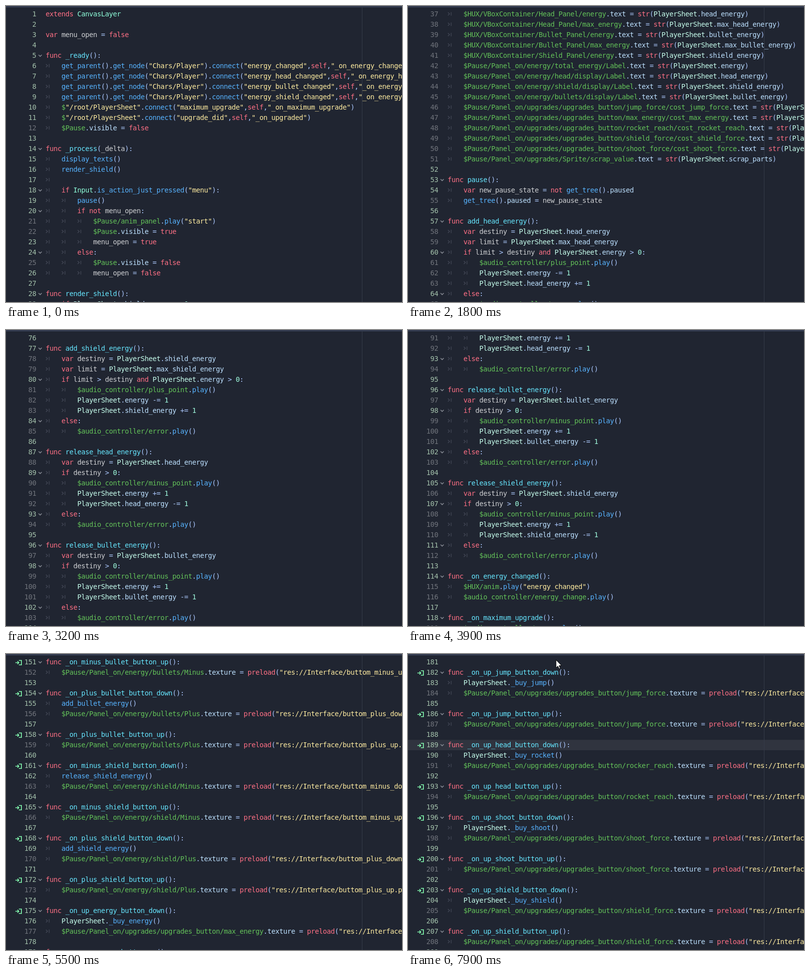
An HTML page with a canvas that plays this animation: 800x600 px, repeating every 8 s.

```html
<!DOCTYPE html>
<html lang="en">
<head>
<meta charset="utf-8">
<title>Script editor scroll</title>
<style>
  html, body { margin: 0; width: 100%; height: 100%; overflow: hidden; background: #202531; }
  canvas { display: block; }
</style>
</head>
<body>
<canvas id="stage" width="800" height="600"></canvas>
<script>
const ctx = document.getElementById('stage').getContext('2d');
const ROW = 21, CELL = 8, LEFT = 80, LOOP = 8000, CURRENT_LINE = 189;

const COLOR = {
  back: '#202531', strip: '#333b4f', ruler: '#353b49', current: '#30343f',
  keyword: '#ff7085', engine: '#8effda', user: '#c6ffed', string: '#ffeca1',
  call: '#57b3ff', member: '#bce0ff', symbol: '#abc8ff', number: '#a1ffe0',
  text: '#cdcfd2', define: '#66e6ff', path: '#63c259',
  lineNo: '#70747c', safeNo: '#a3c1ab', tab: '#454a59', fold: '#858a93', slot: '#84ffb1'
};

// ---- script text ----
const HUX = '\t$HUX/VBoxContainer/', PANEL = '\t$Pause/Panel_on/', UP = PANEL + 'upgrades/upgrades_button/';
const shown = (path, value) => `${path}.text = str(PlayerSheet.${value})`;
const signal = (name, handler = '_on_' + name) =>
  `\tget_parent().get_node("Chars/Player").connect("${name}",self,"${handler}")`;
const texture = (path, image) => `${path}.texture = preload("res://Interface/buttom_${image}.png")`;
const play = (sound, tabs = '\t\t') => `${tabs}$audio_controller/${sound}.play()`;
const cost = name => shown(`${UP}${name}/cost_${name}`, 'cost_' + name);

const addEnergy = kind => [
  `func add_${kind}_energy():`,
  `\tvar destiny = PlayerSheet.${kind}_energy`,
  `\tvar limit = PlayerSheet.max_${kind}_energy`,
  '\tif limit > destiny and PlayerSheet.energy > 0:',
  play('plus_point'), '\t\tPlayerSheet.energy -= 1', `\t\tPlayerSheet.${kind}_energy += 1`,
  '\telse:', play('error'), ''
];
const releaseEnergy = kind => [
  `func release_${kind}_energy():`,
  `\tvar destiny = PlayerSheet.${kind}_energy`,
  '\tif destiny > 0:',
  play('minus_point'), '\t\tPlayerSheet.energy += 1', `\t\tPlayerSheet.${kind}_energy -= 1`,
  '\telse:', play('error'), ''
];
const button = (name, action, downPath, image, upPath = downPath) => [
  `func _on_${name}_button_down():`, '\t' + action, texture(downPath, image + '_down'), '',
  `func _on_${name}_button_up():`, texture(upPath, image + '_up'), ''
];
const energyButton = (sign, kind) => button(`${sign}_${kind}`,
  `${sign === 'plus' ? 'add' : 'release'}_${kind}_energy()`,
  `${PANEL}energy/${kind === 'bullet' ? 'bullets' : kind}/${sign === 'plus' ? 'Plus' : 'Minus'}`, sign);
const upgradeButton = (name, buy, down, up = down) =>
  button('up_' + name, `PlayerSheet._buy_${buy}()`, UP + down, 'up', UP + up);
const handler = (name, body) => [`func _on_${name}():`, body, ''];

const lines = [
  'extends CanvasLayer', '', 'var menu_open = false', '',
  'func _ready():',
  signal('energy_changed'), signal('energy_head_changed'),
  signal('energy_bullet_changed'), signal('energy_shield_changed'),
  '\t$"/root/PlayerSheet".connect("maximum_upgrade",self,"_on_maximum_upgrade")',
  '\t$"/root/PlayerSheet".connect("upgrade_did",self,"_on_upgraded")',
  '\t$Pause.visible = false', '',
  'func _process(_delta):', '\tdisplay_texts()', '\trender_shield()', '\t',
  '\tif Input.is_action_just_pressed("menu"):', '\t\tpause()',
  '\t\tif not menu_open:', '\t\t\t$Pause/anim_panel.play("start")',
  '\t\t\t$Pause.visible = true', '\t\t\tmenu_open = true',
  '\t\telse:', '\t\t\t$Pause.visible = false', '\t\t\tmenu_open = false', '',
  'func render_shield():', '\tif PlayerSheet.shield_energy > 0:',
  '\t\t$Shield.visible = true', '\telse:', '\t\t$Shield.visible = false', '',
  'func display_texts():',
  shown(HUX + 'Panel/energy', 'energy'), shown(HUX + 'Panel/max_energy', 'max_energy'),
  shown(HUX + 'Head_Panel/energy', 'head_energy'), shown(HUX + 'Head_Panel/max_energy', 'max_head_energy'),
  shown(HUX + 'Bullet_Panel/energy', 'bullet_energy'), shown(HUX + 'Bullet_Panel/max_energy', 'max_bullet_energy'),
  shown(HUX + 'Shield_Panel/energy', 'shield_energy'),
  shown(PANEL + 'energy/total_energy/Label', 'energy'),
  shown(PANEL + 'energy/head/display/Label', 'head_energy'),
  shown(PANEL + 'energy/shield/display/Label', 'shield_energy'),
  shown(PANEL + 'energy/bullets/display/Label', 'bullet_energy'),
  ...['jump_force', 'max_energy', 'rocket_reach', 'shield_force', 'shoot_force'].map(cost),
  shown(PANEL + 'upgrades/Sprite/scrap_value', 'scrap_parts'), '',
  'func pause():', '\tvar new_pause_state = not get_tree().paused',
  '\tget_tree().paused = new_pause_state', '',
  ...['head', 'bullet', 'shield'].flatMap(addEnergy),
  ...['head', 'bullet', 'shield'].flatMap(releaseEnergy),
  'func _on_energy_changed():', '\t$HUX/anim.play("energy_changed")', play('energy_change', '\t'), '',
  ...handler('maximum_upgrade', play('error', '\t')),
  ...handler('upgraded', play('upgrade', '\t')),
  ...handler('energy_head_changed', '\t$HUX/anim.play("head_energy")'),
  ...handler('energy_bullet_changed', '\t$HUX/anim.play("bullet_energy")'),
  ...handler('energy_shield_changed', '\t$HUX/anim.play("shield_animation")'),
  ...energyButton('plus', 'head'), ...energyButton('minus', 'head'),
  ...energyButton('minus', 'bullet'), ...energyButton('plus', 'bullet'),
  ...energyButton('minus', 'shield'), ...energyButton('plus', 'shield'),
  ...upgradeButton('energy', 'energy', 'max_energy'),
  ...upgradeButton('jump', 'jump', 'jump_force'),
  ...upgradeButton('head', 'rocket', 'rocker_reach', 'rocket_reach'),
  ...upgradeButton('shoot', 'shoot', 'shoot_force'),
  ...upgradeButton('shield', 'shield', 'shield_force')
];

// ---- syntax colours ----
const KEYWORDS = /^(extends|var|func|if|not|else|and|self|true|false|str|preload)$/;

function tokenColor(token, before, after) {
  if (token[0] === '"') return COLOR.string;
  if (token[0] === '$') return COLOR.path;
  if (/^\d+$/.test(token)) return COLOR.number;
  if (!/^\w/.test(token)) return COLOR.symbol;
  if (KEYWORDS.test(token)) return COLOR.keyword;
  if (token === 'PlayerSheet') return COLOR.user;
  if (token === 'CanvasLayer' || token === 'Input') return COLOR.engine;
  if (before.endsWith('func ')) return COLOR.define;
  if (after[0] === '(') return COLOR.call;
  return before.endsWith('.') ? COLOR.member : COLOR.text;
}

function isSafe(code) {
  if (/\$\w|get_tree\(\)\.paused =/.test(code)) return false;
  return !/PlayerSheet\./.test(code) || /^\s*if |_buy_/.test(code);
}

const rows = lines.map(line => {
  const tabs = line.match(/^\t*/)[0].length, code = line.slice(tabs);
  const tokens = [...code.matchAll(/"[^"]*"|\$[\w\/]*|\w+|[^\s\w]/g)].map(m => ({
    text: m[0], col: tabs * 4 + m.index,
    color: tokenColor(m[0], code.slice(0, m.index), code.slice(m.index + m[0].length))
  }));
  return { tabs, tokens, safe: isSafe(code), fold: code.endsWith(':'), slot: /_button_(down|up)\(\):/.test(code) };
});

// ---- drawing ----
function print(text, x, y, color) {
  ctx.fillStyle = color;
  [...text].forEach((ch, i) => ctx.fillText(ch, x + i * CELL, y));
}

function trace(color, width, ...paths) {
  ctx.strokeStyle = color;
  ctx.lineWidth = width;
  ctx.beginPath();
  for (const [start, ...rest] of paths) {
    ctx.moveTo(...start);
    rest.forEach(p => ctx.lineTo(...p));
  }
  ctx.stroke();
}

function drawRow(row, number, mid) {
  const base = mid + 5, label = String(number);
  print(label, 61 - label.length * CELL, base, row.safe ? COLOR.safeNo : COLOR.lineNo);
  if (row.fold) trace(COLOR.fold, 1.7, [[65.8, mid - 1], [69, mid + 2], [72.2, mid - 1]]);
  if (row.slot) {
    const y = mid + 1.5;
    trace(COLOR.slot, 1.6, [[19, y], [25.5, y]], [[23, y - 3], [26, y], [23, y + 3]],
      [[26, y - 4.5], [31.2, y - 4.5], [31.2, y + 4.5], [26, y + 4.5]]);
  }
  for (let t = 0; t < row.tabs; t++) {
    const x = LEFT + t * 32;
    trace(COLOR.tab, 1.2, [[x + .7, mid - 3], [x + 4, mid], [x + .7, mid + 3]], [[x + 7.2, mid - 3.5], [x + 7.2, mid + 3.5]]);
  }
  row.tokens.forEach(t => print(t.text, LEFT + t.col * CELL, base, t.color));
}

function drawPointer([x, y]) {
  ctx.save();
  ctx.translate(x, y);
  ctx.beginPath();
  [[0, 0], [0, 16], [3.7, 12.6], [6.3, 18], [8.6, 17], [6.2, 11.7], [11, 11.3]].forEach(p => ctx.lineTo(...p));
  ctx.closePath();
  ctx.fillStyle = '#fff';
  ctx.fill();
  ctx.strokeStyle = '#000';
  ctx.lineWidth = 1;
  ctx.stroke();
  ctx.restore();
}

function draw(first, pointer) {
  ctx.fillStyle = COLOR.back;
  ctx.fillRect(0, 0, 800, 600);
  ctx.fillStyle = COLOR.current;
  if (first <= CURRENT_LINE) ctx.fillRect(0, 6 + (CURRENT_LINE - first) * ROW, 800, ROW);
  ctx.fillStyle = COLOR.ruler;
  ctx.fillRect(719, 0, 1, 600);
  ctx.font = '14px "DejaVu Sans Mono", monospace';
  for (let i = 0; i < 29 && rows[first - 1 + i]; i++) drawRow(rows[first - 1 + i], first + i, 16 + i * ROW);
  ctx.fillStyle = COLOR.strip;
  ctx.fillRect(0, 0, 800, 3);
  if (pointer) drawPointer(pointer);
}

// ---- timing: [tenths of a second, top line] ----
const SCROLL = [
  [0, 1], [2, 4], [3, 7], [4, 10], [5, 13], [6, 16], [7, 19], [8, 22], [10, 25], [12, 28], [14, 31], [16, 34], [18, 37],
  [19, 40], [21, 46], [23, 52], [25, 55], [26, 58], [28, 64], [30, 70], [32, 76], [33, 79], [35, 85], [38, 88], [39, 91],
  [40, 94], [41, 97], [43, 103], [44, 109], [46, 112], [47, 115], [48, 121], [49, 124], [50, 130], [52, 136], [53, 142],
  [54, 145], [55, 151], [57, 157], [59, 163], [63, 166], [65, 172], [67, 175], [68, 178], [69, 181]
];
const POINTER = [[77, [503, 257]], [78, [390, 120]], [79, [299, 12]]];
const valueAt = (keys, tick) => keys.filter(([at]) => at <= tick).pop()?.[1];

const begin = performance.now();
let drawn = -1;
function frame() {
  const tick = Math.floor(((performance.now() - begin) % LOOP) / 100);
  if (tick !== drawn) draw(valueAt(SCROLL, tick), valueAt(POINTER, tick));
  drawn = tick;
  requestAnimationFrame(frame);
}
frame();
</script>
</body>
</html>
```
